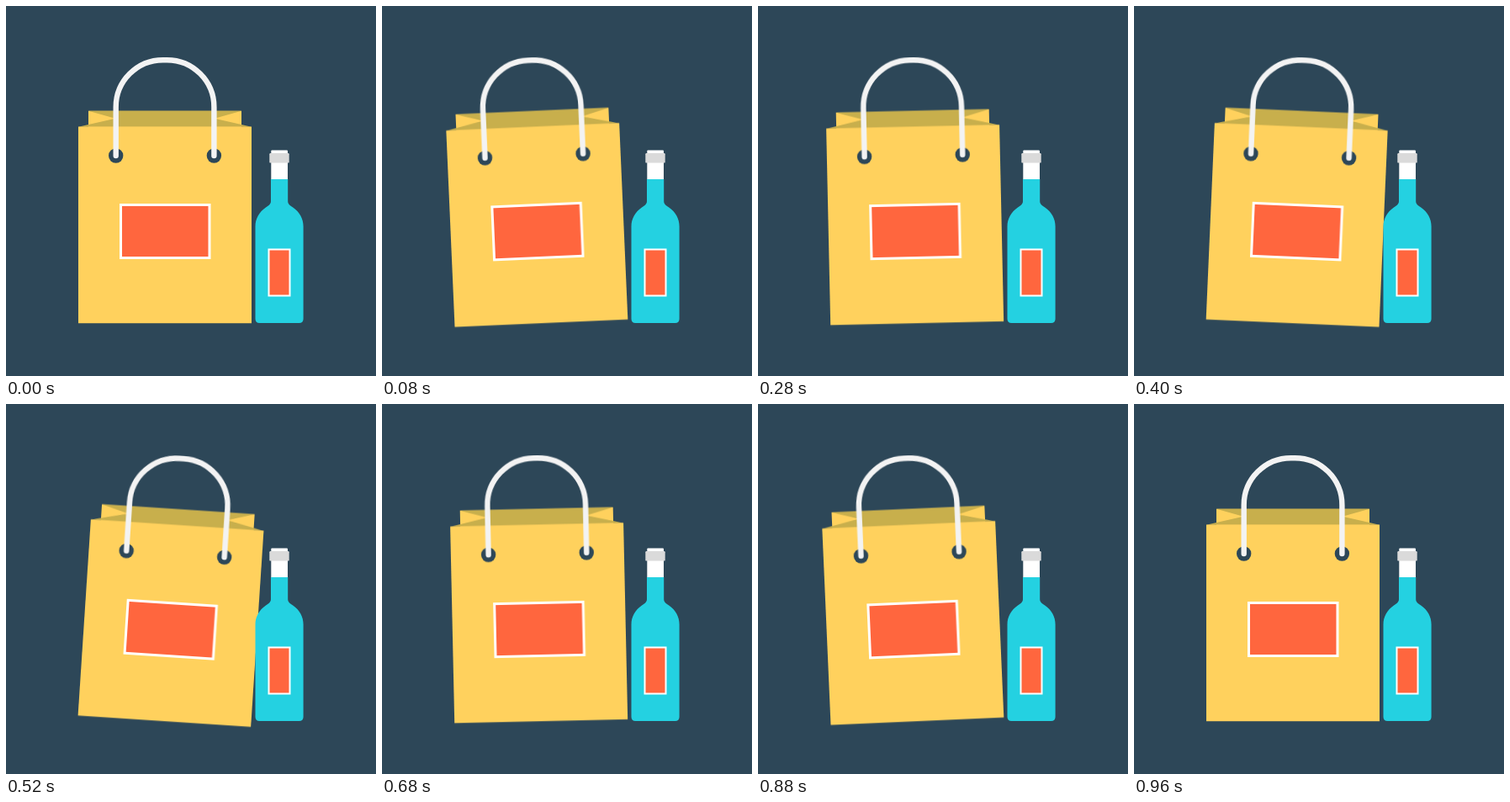
Animation of 440x440 px, one loop 1120 ms. Source, as an HTML page:

```html
<!DOCTYPE html>
<html lang="en">
<head>
<meta charset="utf-8">
<title>Swinging bag</title>
<style>
  html, body { margin: 0; width: 100%; height: 100%; overflow: hidden; background: #2d4758; }
  svg { display: block; width: 100vw; height: 100vh; }
  #bag { transform-box: view-box; transform-origin: 189px 367.5px; }
</style>
</head>
<body>
<svg viewBox="0 0 440 440">
  <g id="bag">
    <path fill="#ffd15d" d="M98 124.7H280V144H98Z"/>
    <path fill="#c8af4c" d="M98 124.7H280L248 133.7L292 143.7H86L130 133.7Z"/>
    <path fill="#ffd15d" d="M86 143.5H292V377.2H86Z"/>
    <g fill="#2d4758">
      <circle cx="130.7" cy="178" r="8.7"/>
      <circle cx="247.4" cy="178" r="8.7"/>
    </g>
    <path fill="none" stroke="#f3f3f3" stroke-width="6.4" stroke-linecap="round"
      d="M130.7 178V120.2A56 56 0 0 1 186.7 64.2H191.4A56 56 0 0 1 247.4 120.2V178"/>
    <rect x="136.5" y="236.5" width="105.5" height="63" fill="#ff663e" stroke="#fff" stroke-width="3"/>
  </g>
  <g>
    <path fill="#fff" d="M315.3 172.5Q315.3 171.5 316.3 171.5H334Q335 171.5 335 172.5V207H315.3Z"/>
    <rect x="313.3" y="175" width="23.4" height="11.6" rx="1.2" fill="#dadada"/>
    <path fill="#24d1e1" d="M315 206H335.2V232C335.2 236 338.2 237.5 341.2 239.5
      C349.2 245 353.6 253 353.6 262V372Q353.6 377 348.6 377H301.5Q296.5 377 296.5 372V262
      C296.5 253 301 245 309 239.5C312 237.5 315 236 315 232Z"/>
    <rect x="312.5" y="289.5" width="25" height="55" fill="#ff663e" stroke="#fff" stroke-width="2"/>
  </g>
</svg>
<script>
  const LOOP = 1120, STEP = 40;
  // [time in ms, angle in degrees]
  const swing = [[0, 0], [160, -5], [480, 5], [800, -5], [960, 0], [LOOP, 0]];

  const frames = swing.map(([time, angle], i) => {
    const next = swing[i + 1] || [time + STEP];
    return {
      offset: time / LOOP,
      transform: `rotate(${angle}deg)`,
      easing: `steps(${(next[0] - time) / STEP}, end)`
    };
  });

  document.getElementById("bag").animate(frames, { duration: LOOP, iterations: Infinity });
</script>
</body>
</html>
```
